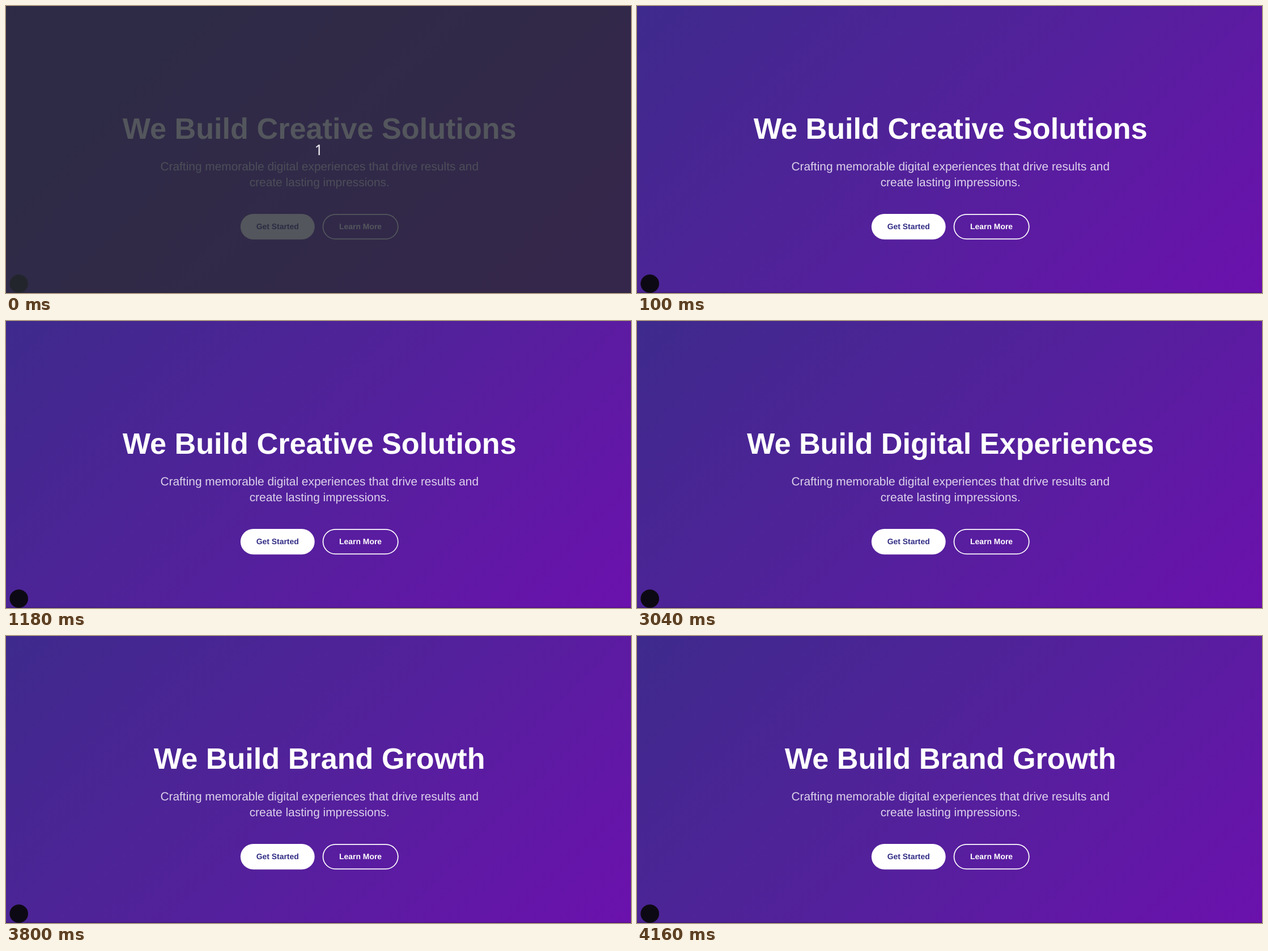
An HTML page with a canvas that plays this animation: 1103 px wide and 508 px high, repeating every 4400 ms.

```html
<!DOCTYPE html>
<html lang="en">
<head>
<meta charset="utf-8">
<title>Hero</title>
<style>
  html, body { margin: 0; width: 100%; height: 100%; overflow: hidden; background: #53219b; }
  canvas { display: block; }
</style>
</head>
<body>
<canvas id="stage" width="1103" height="508"></canvas>
<script>
const canvas = document.getElementById('stage');
const ctx = canvas.getContext('2d');
const W = canvas.width, H = canvas.height;
const LOOP = 4400, COUNTDOWN_END = 100;
const ZOOM = 0.87;
const CENTER = 553.2;
const SANS = '"Liberation Sans", Arial, sans-serif';

const headlines = [
  { from: 0, text: 'We Build Creative Solutions' },
  { from: 1900, text: 'We Build Digital Experiences' },
  { from: 3800, text: 'We Build Brand Growth' }
];

function label(text, x, y, size, color, weight = 'normal', family = SANS) {
  ctx.font = `${weight} ${size}px ${family}`;
  ctx.textAlign = 'center';
  ctx.textBaseline = 'alphabetic';
  ctx.textRendering = 'geometricPrecision';
  ctx.fillStyle = color;
  ctx.fillText(text, x, y);
}

function pill(x, y, w, h) {
  ctx.beginPath();
  ctx.roundRect(x, y, w, h, h / 2);
}

function drawBackground() {
  // 45° axis whose ends meet the top left and bottom right corners
  const reach = (W + H) / 2;
  const gradient = ctx.createLinearGradient(0, 0, reach, reach);
  gradient.addColorStop(0, 'rgb(62,42,140)');
  gradient.addColorStop(0.5, 'rgb(83,33,155)');
  gradient.addColorStop(1, 'rgb(107,17,173)');
  ctx.fillStyle = gradient;
  ctx.fillRect(0, 0, W, H);
  ctx.fillStyle = 'rgba(0,0,0,0.2)';
  ctx.fillRect(0, 506.5, W, 1.5);
}

function drawButtons() {
  const top = 368, height = 52 * ZOOM, baseline = 395.4, size = 16 * ZOOM;
  const border = 2 * ZOOM;

  ctx.fillStyle = '#fff';
  pill(413.8, top, 130.9, height);
  ctx.fill();
  label('Get Started', 479.2, baseline, size, '#312c85', 'bold');

  ctx.strokeStyle = '#fff';
  ctx.lineWidth = border;
  pill(558.6 + border / 2, top + border / 2, 134.1 - border, height - border);
  ctx.stroke();
  label('Learn More', 625.6, baseline, size, '#fff', 'bold');
}

function drawBadge() {
  ctx.fillStyle = '#0d0914';
  ctx.beginPath();
  ctx.arc(22.7, 491.5, 16.3, 0, Math.PI * 2);
  ctx.fill();
}

function drawCountdown() {
  ctx.fillStyle = 'rgba(40,44,52,0.8)';
  ctx.fillRect(0, 0, W, H);
  label('1', 552, 263.8, 26, '#f4f2fa', 'normal', '"Noto Sans", "Open Sans", sans-serif');
}

function draw(time) {
  const headline = headlines.findLast(item => time >= item.from);
  drawBackground();
  label(headline.text, CENTER, 234.5, 60 * ZOOM, '#fff', 'bold');

  const soft = 'rgba(255,255,255,0.8)';
  label('Crafting memorable digital experiences that drive results and', CENTER, 291.4, 24 * ZOOM, soft);
  label('create lasting impressions.', CENTER, 319.3, 24 * ZOOM, soft);

  drawButtons();
  drawBadge();
  if (time < COUNTDOWN_END) drawCountdown();
}

const start = performance.now();
function tick() {
  draw((performance.now() - start) % LOOP);
  requestAnimationFrame(tick);
}
tick();
</script>
</body>
</html>
```
